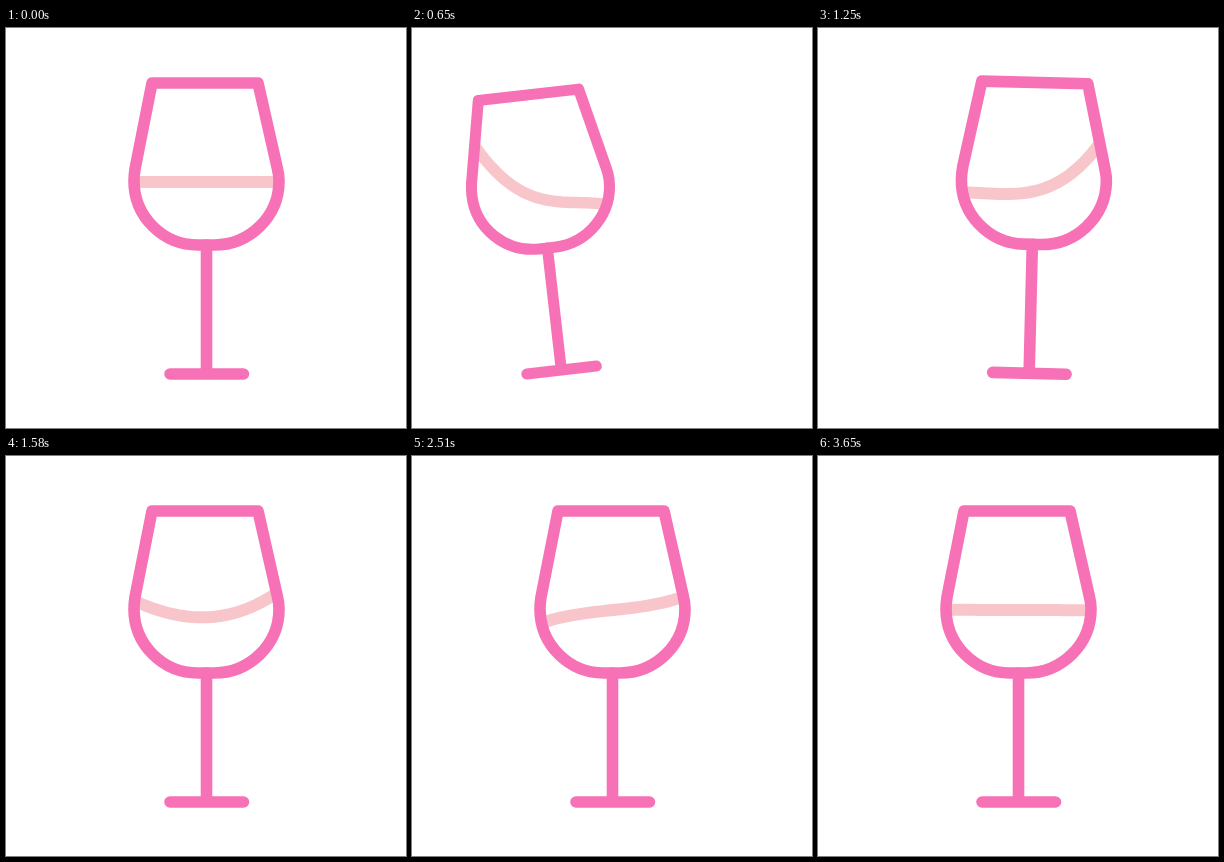
These frames come from a looping animation (400 by 400 pixels, 3.68 s). An HTML page:

```html
<!DOCTYPE html>
<html lang="en">
<head>
<meta charset="utf-8">
<title>Swirling glass</title>
<style>
  html, body { margin: 0; width: 100%; height: 100%; overflow: hidden; background: #fff; }
  svg { display: block; width: 100%; height: 100%; }
  #glass { fill: none; stroke: #f771b7; stroke-width: 11.6; stroke-linejoin: round; stroke-linecap: round; }
  #wine { stroke: #f8c6ca; stroke-width: 12; }
</style>
</head>
<body>
<svg viewBox="0 0 400 400">
  <defs>
    <path id="bowl" d="M146 55H252L271.5 141Q273 147 273 153A65 64 0 0 1 208 217H192A64 64 0 0 1 128 153Q128 148 129 141Z"/>
    <clipPath id="inside"><use href="#bowl"/></clipPath>
  </defs>
  <g id="glass">
    <g clip-path="url(#inside)"><path id="wine"/></g>
    <use href="#bowl"/>
    <path d="M200.5 217V346M164 346H237.5"/>
  </g>
</svg>
<script>
  const LOOP = 3680, HOLD = 230, STEP = 30;
  const FOOT = { x: 201, y: 346 };
  const LEVEL = 154, MIDDLE = 200.5, RADIUS = 67;
  const glass = document.getElementById('glass');
  const wine = document.getElementById('wine');

  const mix = (a, b, p) => a + (b - a) * p;
  const smooth = s => s * s * (3 - 2 * s);
  const cubic = s => s < .5 ? 4 * s ** 3 : 1 - 4 * (1 - s) ** 3;
  const ramp = (t, from, to) => smooth(Math.min(1, Math.max(0, (t - from) / (to - from))));

  // Wind up, swing left (-1), swing right (1), overshoot a little, rest
  function swing(t, left, right, settle) {
    if (t < 275) return .09 * ramp(t, 200, 275);
    if (t < left) return mix(.09, -1, ramp(t, 275, left));
    if (t < right) return mix(-1, 1, cubic((t - left) / (right - left)));
    if (t < settle) return mix(1, -.08, ramp(t, right, settle));
    return mix(-.08, 0, ramp(t, settle, settle + 200));
  }

  // The glass looks smaller at the far side of the swirl
  function size(t) {
    const near = Math.min(1, Math.abs(t - 800) / 470);
    return 1 - .031 * (1 + Math.cos(Math.PI * near));
  }

  // The wine trails the glass, then rings down to level
  function tilt(t) {
    const ring = 24 * (LOOP - t) / (LOOP - 1300) * Math.cos(2 * Math.PI * (t - 2120) / 800);
    return -42 * swing(t, 600, 1100, 1500) + ring * ramp(t, 1400, 1700);
  }

  const sag = t => 28 * ramp(t, HOLD, 600) * (1 - ramp(t, 900, 2600));

  function surface(t) {
    const lean = tilt(t), dip = sag(t), points = [];
    for (let x = 116; x <= 286; x += 5) {
      const v = (x - MIDDLE) / RADIUS;
      const y = LEVEL + lean * v * (.6 + .4 * v * v) + dip * (.4 - v * v);
      points.push(x + ' ' + y.toFixed(2));
    }
    return 'M' + points.join('L');
  }

  function draw(t) {
    const angle = 6.75 * swing(t, 568, 1075, 1340);
    const scale = size(t);
    const x = FOOT.x + 58.5 * swing(t, 510, 1070, 1335);
    const y = FOOT.y - .5 * Math.abs(angle) - 16 * (1 - scale);
    glass.setAttribute('transform',
      `translate(${x} ${y}) rotate(${angle}) scale(${scale}) translate(${-FOOT.x} ${-FOOT.y})`);
    wine.setAttribute('d', surface(t));
  }

  const start = performance.now();
  function tick() {
    const t = (performance.now() - start) % LOOP;
    draw(t < HOLD ? 0 : HOLD + Math.floor((t - HOLD) / STEP) * STEP);
    requestAnimationFrame(tick);
  }
  tick();
</script>
</body>
</html>
```
